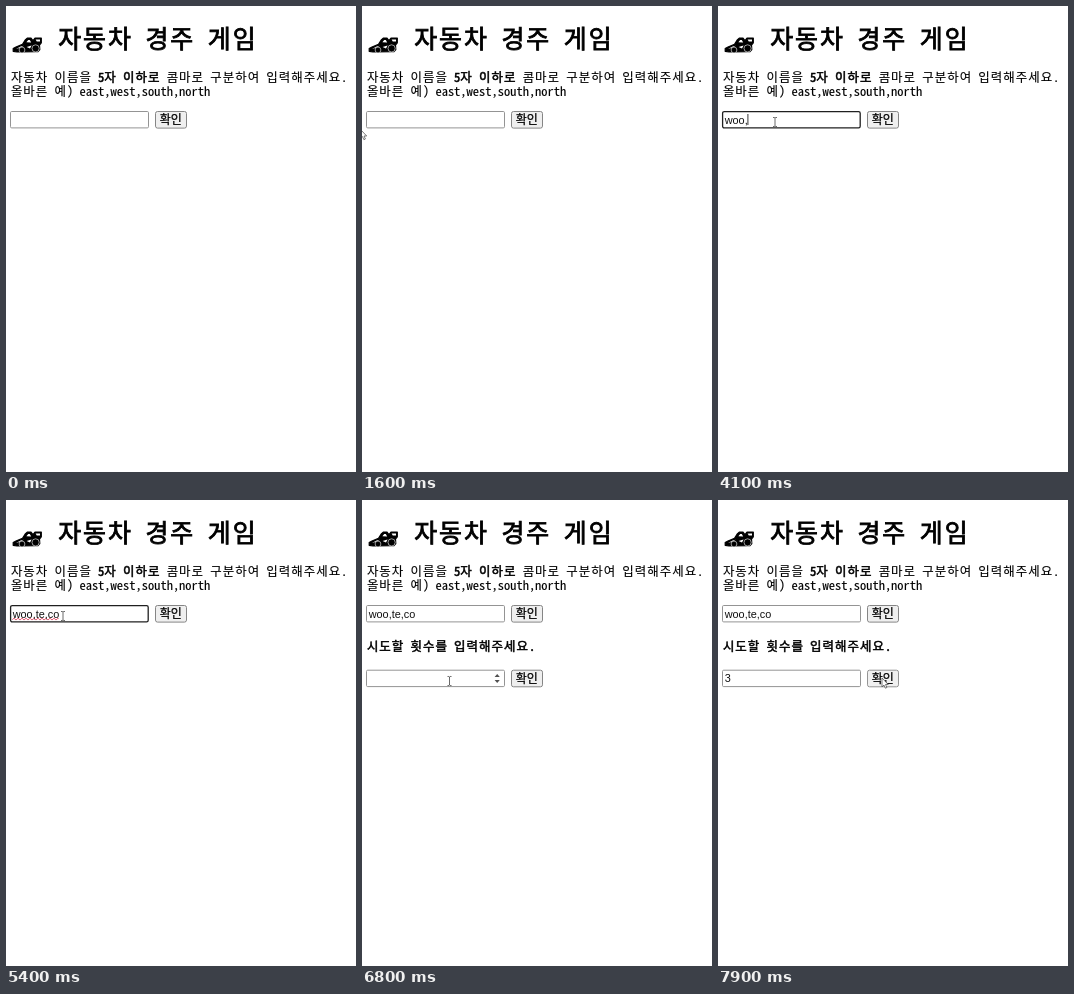
These frames come from a looping animation (350 px wide and 466 px high, 8 s). An HTML page:

```html
<!DOCTYPE html>
<html lang="ko">
<head>
<meta charset="utf-8">
<title>자동차 경주 게임</title>
<style>
html, body { margin: 0; width: 100%; height: 100%; overflow: hidden; background: #fff; }
svg { display: block; width: 350px; height: 466px; }
.mono { font-family: "Noto Sans Mono CJK KR", "Noto Sans CJK KR", "Noto Sans CJK", monospace; white-space: pre; stroke: #000; }
.label { font: 12px "Noto Sans CJK KR", "Noto Sans CJK", sans-serif; text-anchor: middle; stroke: #000; stroke-width: .25; }
.value { font: 10.9px "Liberation Sans", Arial, sans-serif; fill: #111; }
</style>
</head>
<body>
<svg id="stage" viewBox="0 0 350 466" xmlns="http://www.w3.org/2000/svg">
  <g id="car">
    <path d="M7.2 45.3V42.6L10 41 16.5 38.3 19.5 33.6 21.5 32H24.8L27 34.6 29 32H35.3V36.8L33.5 39 33.8 43.5 32 45.6 11 46Z" stroke="#000" stroke-width="1.2" stroke-linejoin="round"/>
    <path d="M20.4 36.2 22.2 34H23.8L25.2 36.6Z M29.6 33.4H34V35.6H30.8Z M10 42.9 14.6 40.6 18 39.8 13.4 42Z M20.6 41 25.6 39.6 24 42.4Z" fill="#fff"/>
    <g stroke="#fff" stroke-width=".6">
      <circle cx="16" cy="44" r="2.9"/>
      <circle cx="29.6" cy="42.4" r="3.6"/>
    </g>
  </g>
</svg>
<script>
const LOOP = 8000, STEP = 100, EM = 12.46, LEFT = 4.9;
const BODY = .12, BOLD = .5;
const stage = document.getElementById('stage');

function el(tag, attrs, parent = stage) {
  const node = document.createElementNS('http://www.w3.org/2000/svg', tag);
  set(node, attrs);
  parent.append(node);
  return node;
}
function set(node, attrs) {
  for (const key in attrs) node.setAttribute(key, attrs[key]);
}
const show = (node, on) => set(node, { display: on ? 'inline' : 'none' });

// Hangul fills one em of the grid, everything else half an em.
function mono(text, x, y, size, weight, parent = stage) {
  const xs = [];
  for (const ch of text) {
    xs.push(x.toFixed(2));
    x += ch >= '가' ? size : size / 2;
  }
  el('text', { class: 'mono', x: xs.join(' '), y, 'font-size': size, 'stroke-width': weight }, parent).textContent = text;
  return x;
}

function makeRow(y) {
  const root = el('g', { transform: `translate(0 ${y})` });
  const box = el('rect', { fill: '#fff' }, root);
  const d = 'M6.5 14.6' + 'l1-1h1l1 1h1'.repeat(11) + 'l1-1h1';
  const wave = el('path', { d, fill: 'none', stroke: '#e0324f' }, root);
  const value = el('text', { class: 'value', x: 6.7, y: 12.5 }, root);
  const caret = el('path', { stroke: '#000', 'stroke-width': .8 }, root);
  const spin = el('path', { d: 'M132.6 7.2 135.2 4.2 137.8 7.2Z M132.6 10.4H137.8L135.2 13.4Z', fill: '#505050' }, root);
  const button = el('rect', { x: 149.5, y: .5, width: 31, height: 16.6, rx: 2 }, root);
  el('text', { class: 'label', x: 164.8, y: 13 }, root).textContent = '확인';
  return { root, box, wave, value, caret, spin, button };
}

function drawRow(row, s) {
  show(row.root, s.visible);
  set(row.box, s.focus
    ? { x: 4.6, y: .6, width: 137.6, height: 16.3, rx: 1.6, stroke: '#202020', 'stroke-width': 1.3 }
    : { x: 4.5, y: .5, width: 138, height: 16.4, rx: 1.2, stroke: '#949494', 'stroke-width': 1 });
  row.value.textContent = s.text;
  const end = 6.9 + (s.text ? row.value.getComputedTextLength() : 0);
  set(row.caret, { d: `M${end} 3V14` });
  for (const part of ['caret', 'wave', 'spin']) show(row[part], s[part]);
  const [fill, stroke] = s.press ? ['#f0f0f0', '#949494'] : s.hover ? ['#e5e5e5', '#666'] : ['#efefef', '#858585'];
  set(row.button, { fill, stroke });
}

mono('자동차 경주 게임', 52.2, 41.8, EM * 2, .85);
let x = mono('자동차 이름을 ', LEFT, 75.5, EM, BODY);
x = mono('5자 이하로', x, 75.5, EM, BOLD);
mono(' 콤마로 구분하여 입력해주세요.', x, 75.5, EM, BODY);
mono('올바른 예) east,west,south,north', LEFT, 90, EM, BODY);

const names = makeRow(105);
const tries = makeRow(169.7);
const question = el('g', {});
mono('시도할 횟수를 입력해주세요.', LEFT, 150.5, EM, BOLD, question);

const arrow = el('path', { d: 'M0 0V8.9L2 7.1 3.4 10.2 4.9 9.5 3.5 6.5H6.2Z', fill: '#fff', stroke: '#444', 'stroke-width': .7 });
const beam = el('path', { d: 'M-2-4.5H-.6L0-4 .6-4.5H2M0-4V4M-2 4.5H-.6L0 4 .6 4.5H2', fill: 'none', stroke: '#444', 'stroke-width': .8 });

// Visits of the pointer: [ms, x, y]; it is away between them.
const visits = [
  [[100, 322, 72], [200, 24, 4]],
  [[600, 241, 2]],
  [[900, 248, 4], [1000, 174, 108]],
  [[1400, 307, 6], [1500, 150, 139], [1600, -1.5, 123.5], [1700, -3, 121]],
  [[2000, 14, 124], [2200, 57, 116], [5400, 57, 116], [5600, 112, 115], [5800, 161, 111.5],
   [6500, 161, 111.5], [6600, 164, 126], [6700, 124, 167], [6800, 87.5, 181], [7200, 87.5, 181],
   [7400, 148, 180], [7500, 164, 178], [8000, 164, 178]]
];

function pointerAt(t) {
  const path = visits.find(v => t >= v[0][0] && t <= v[v.length - 1][0]);
  if (!path) return null;
  const i = path.findIndex(p => p[0] >= t);
  const b = path[i], a = path[Math.max(i - 1, 0)];
  const k = a === b ? 1 : (t - a[0]) / (b[0] - a[0]);
  return { x: a[1] + (b[1] - a[1]) * k, y: a[2] + (b[2] - a[2]) * k };
}

const keys = [2600, 3500, 3700, 4100, 4300, 4400, 4600, 4700, 4800];
const within = (v, a, b) => v >= a && v < b;

function draw(t) {
  const p = pointerAt(t);
  const inRow = y => p && within(p.y, y, y + 18);
  const overField = y => inRow(y) && within(p.x, 4, 143);
  const overButton = y => inRow(y) && within(p.x, 149, 181);
  const asked = t >= 6300;
  const naming = within(t, 2200, 6200);
  const counting = within(t, 6900, 7900);

  drawRow(names, {
    visible: true,
    focus: naming,
    text: 'woo,te,co'.slice(0, keys.filter(k => t >= k).length),
    caret: naming && !within(t, 3000, 3500) && !within(t, 5400, 5900),
    wave: within(t, 5400, 6200),
    spin: false,
    hover: overButton(105),
    press: within(t, 6200, 6400)
  });
  drawRow(tries, {
    visible: asked,
    focus: counting,
    text: t >= 7100 ? '3' : '',
    caret: counting,
    wave: false,
    spin: counting || asked && overField(169),
    hover: overButton(169),
    press: t >= 7900
  });
  show(question, asked);

  const onText = p && (overField(105) || asked && overField(169) || within(p.y, 65, 91));
  show(arrow, p && !onText);
  show(beam, onText);
  if (p) set(onText ? beam : arrow, { transform: `translate(${p.x} ${p.y})` });
}

function tick() {
  const t = performance.now() % LOOP;
  draw(Math.floor(t / STEP) * STEP);
  requestAnimationFrame(tick);
}
tick();
</script>
</body>
</html>
```
